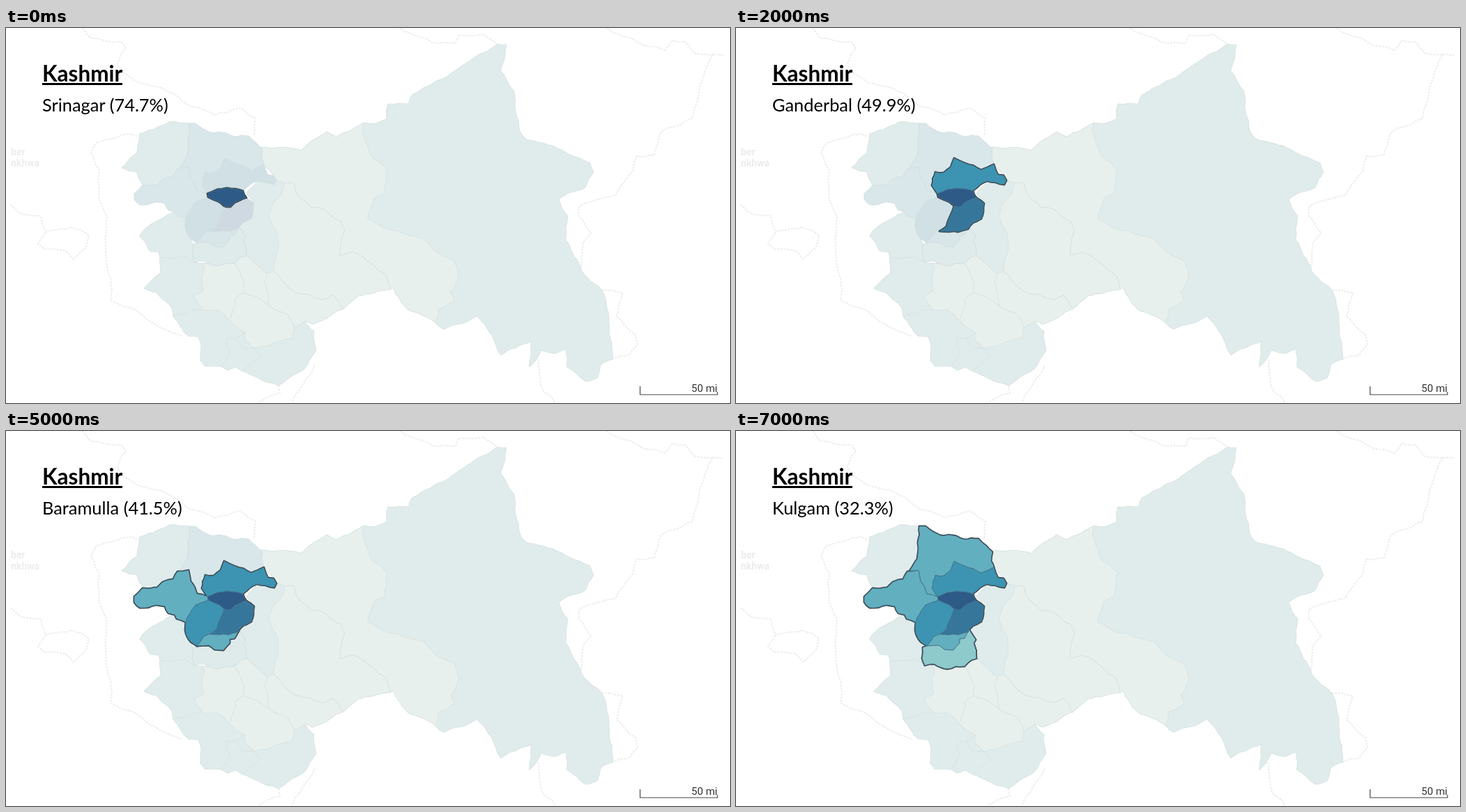
Recreate the animation shown at these times as an HTML page. Size 1039 by 539 pixels, loop 8 s.

```html
<!DOCTYPE html>
<html lang="en">
<head>
<meta charset="utf-8">
<title>Kashmir districts</title>
<style>
  @property --t { syntax: "<integer>"; inherits: true; initial-value: 0; }
  @keyframes step { from { --t: 0; } to { --t: 8; } }
  html, body { margin: 0; width: 100%; height: 100%; overflow: hidden; background: #fff; }
  body { position: relative; animation: step 8s steps(8, end) infinite; }
  svg { position: absolute; inset: 0; width: 1039px; height: 539px; }
  path { stroke-linejoin: round; }
  .dots { fill: none; stroke: #ededed; stroke-width: 2; stroke-dasharray: 3 1.5; }
  .land { fill: #e0ecec; stroke: #dae5e4; stroke-width: 1.2; }
  .pale { fill: #e8f0ed; }
  .lines { fill: none; }
  .muted { fill: var(--muted); stroke: #d3dfe1; }
  .rim, .active { opacity: calc(var(--t) - var(--i) + 1); }
  .rim { fill: none; stroke: #30393f; stroke-width: 2.8; }
  .active { fill: var(--active); stroke: #48738a; stroke-width: .9; }
  .title, .label { position: absolute; left: 52px; white-space: nowrap; color: #000; font-family: Lato, sans-serif; }
  .title { top: 46px; font-size: 31.5px; font-weight: 700; line-height: 38px; }
  .title::after { content: ""; position: absolute; left: 0; right: 0; top: 33px; height: 2.5px; background: #000; }
  .label { top: 90px; width: 300px; height: 40px; overflow: hidden; font-size: 25.4px; line-height: 40px; }
  #names { transform: translateY(calc(var(--t) * -40px)); }
  .scale { font: 15px Roboto, sans-serif; fill: #333; }
  .place { font: 700 14px Roboto, sans-serif; fill: #ececec; }
</style>
</head>
<body>
<svg viewBox="0 0 1039 539">
  <defs id="districts">
    <path data-label="Srinagar (74.7%)" style="--muted:#cbd8e2;--active:#2e5a88" d="M289 238 303 232 317 230 340 234 345 244 328 251 322 257 313 256 306 250 290 243Z"/>
    <path data-label="Pulwama (59.3%)" style="--muted:#ced9e2;--active:#36769b" d="M345 244 356 252 355 264 352 274 340 280 333 289 319 293 292 292 302 285 313 256 322 257 328 251Z"/>
    <path data-label="Ganderbal (49.9%)" style="--muted:#d0e0e5;--active:#3c94b2" d="M313 187 328 194 352 204 370 196 376 211 384 212 388 219 385 225 360 220 340 234 317 230 303 232 289 238 281 226 286 207 298 208 308 200Z"/>
    <path data-label="Budgam (47.5%)" style="--muted:#d0e0e5;--active:#3c94b2" d="M290 243 306 250 313 256 302 285 292 292 284 295 274 309 265 303 257 286 258 275 266 258 272 250Z"/>
    <path data-label="Shopian (42.3%)" style="--muted:#d8e6e9;--active:#62afbf" d="M274 309 284 295 292 292 319 293 333 289 328 298 321 299 321 305 312 315 299 314 291 308Z"/>
    <path data-label="Baramulla (41.5%)" style="--muted:#d9e7ea;--active:#62afbf" d="M184 246 184 238 196 226 217 225 225 217 240 213 246 202 262 200 265 216 274 234 289 238 290 243 272 250 266 258 258 275 245 270 242 264 233 262 228 252 216 250 192 254Z"/>
    <path data-label="Bandipora (34.6%)" style="--muted:#d9e7ea;--active:#62afbf" d="M263 137 272 137 293 150 316 151 328 156 348 155 368 174 366 187 370 196 352 204 328 194 313 187 308 200 298 208 286 207 281 226 289 238 274 234 265 216 262 200 249 201 260 184Z"/>
    <path data-label="Kulgam (32.3%)" style="--muted:#dfebeb;--active:#8ec9cb" d="M274 309 268 311 267 327 271 337 285 335 303 342 328 338 338 329 345 327 341 305 344 300 335 286 328 298 321 299 321 305 312 315 299 314 291 308Z"/>
  </defs>

  <g class="dots">
    <path d="M110 0 120 14 165 20 172 30 160 50 163 62 195 80 235 92 265 113 300 125 336 115 358 130 356 155"/>
    <path d="M188 156 180 152 130 165 122 180 134 204 133 245 145 270 143 320 152 375 150 390 190 408 220 430 252 443"/>
    <path d="M7 254 25 268 50 270 57 293 95 286 119 298 116 312 96 332 85 320 55 318 46 310 57 293"/>
    <path d="M565 0 580 8 612 21 645 22 650 10 685 9 705 23"/>
    <path d="M862 0 905 20 945 32 955 18 975 20 990 37 1030 39M1015 37 995 85 985 130 940 150 930 183 905 184 900 205 875 240 823 256 822 270 840 295 828 310 825 345"/>
    <path d="M855 377 885 380 876 415 903 440 906 455 895 470 871 476"/>
    <path d="M764 476 770 520 788 539M391 514 393 525 362 538M443 485 435 500 410 538"/>
  </g>

  <g class="land">
    <path d="M514 136 530 137 546 131 548 109 578 109 582 97 705 23 718 24 710 62 729 91 737 147 745 159 797 175 838 194 843 207 831 229 793 246 806 270 803 305 826 349 855 377 866 430 871 476 853 485 849 502 832 508 805 487 804 462 786 468 768 463 751 487 754 450 710 470 697 441 676 414 628 433 617 424 620 405 643 392 638 380 650 354 644 335 617 322 600 303 550 290 519 275 528 245 543 238 547 203 525 185 512 150Z"/>
    <path d="M192 152 212 146 234 135 263 137 260 184 249 201 240 213 217 225 196 226 188 207 166 201 188 180Z"/>
    <path d="M242 264 258 275 257 286 265 303 268 311 267 327 271 337 258 329 235 331 221 330 219 322 207 321 192 299 208 282 232 268Z"/>
    <path d="M221 330 235 331 258 329 271 337 281 338 285 345 281 360 283 378 270 385 284 406 262 408 240 414 238 402 216 380 198 374 222 352Z"/>
    <path d="M240 414 262 408 284 406 303 405 343 437 330 446 318 445 316 456 322 465 310 487 285 486 279 478 280 455 276 444 262 443Z"/>
    <path d="M343 437 342 447 355 460 375 457 410 446 413 430 429 421 442 436 445 463 428 490 391 514 350 498 330 487 318 492 310 487 322 465 316 456 318 445 330 446Z"/>
    <path d="M345 238 360 220 388 219 400 223 395 240 383 252 377 270 390 298 391 310 384 350 375 353 345 327 341 305 344 300 335 286 352 274 356 252Z"/>
    <path class="pale" d="M366 171 424 176 460 149 474 156 514 136 512 150 525 185 547 203 543 238 528 245 519 275 550 290 600 303 617 322 644 335 650 354 638 380 643 392 620 405 617 424 576 404 555 373 551 376 545 355 525 339 497 322 479 327 486 290 481 278 455 260 438 258 416 235 413 223 400 223 388 219 384 212 370 196 368 174Z"/>
    <path class="pale" d="M400 223 413 223 416 235 438 258 455 260 481 278 486 290 479 327 497 322 525 339 545 355 551 376 505 385 483 404 470 384 455 391 410 377 384 350 391 310 390 298 377 270 383 252 395 240Z"/>
    <path class="pale" d="M384 350 410 377 455 391 470 384 483 404 455 420 440 426 429 421 413 430 410 446 375 457 355 460 342 447 343 437 303 405 284 406 270 385 283 378 281 360 285 345 281 338 303 342 328 338 338 329 345 327 375 353Z"/>
    <path class="lines" d="M328 338 342 366 341 380 328 390 330 398 322 418M341 380 355 385 378 400 405 413 413 430M375 353 371 365 378 400M330 446 340 460 355 460 365 470 341 492"/>
  </g>

  <g id="base"></g>
  <g id="rims"></g>
  <g id="fills"></g>
  <path d="M910 515V527H1021V523" fill="none" stroke="#444" stroke-width="1.2"/>
  <text class="scale" x="1021" y="523" text-anchor="end">50 mi</text>
  <text class="place" x="7" y="183">ber</text>
  <text class="place" x="7" y="199">nkhwa</text>
</svg>
<div class="title">Kashmir</div>
<div class="label"><div id="names"></div></div>
<script>
  const $ = id => document.getElementById(id);

  // Seeded by position, so neighbours get the same border.
  const noise = (x, y) => {
    const n = Math.sin(x * 12.99 + y * 78.23) * 43758.5;
    return n - Math.floor(n) - 0.5;
  };

  // Midpoints from a to b, pushed sideways for a natural border.
  function roughen(a, b) {
    const dx = b[0] - a[0], dy = b[1] - a[1], len = Math.hypot(dx, dy);
    if (len < 9) return [b];
    const side = dx > 0 || (dx === 0 && dy > 0) ? 1 : -1;
    const mx = (a[0] + b[0]) / 2, my = (a[1] + b[1]) / 2;
    const push = side * noise(mx, my) * Math.min(len, 25) * 0.16 / len;
    const mid = [mx - dy * push, my + dx * push];
    return [...roughen(a, mid), ...roughen(mid, b)];
  }

  function roughPath(d) {
    return d.match(/M[^M]+/g).map(part => {
      const closed = part.endsWith("Z");
      const nums = part.match(/\d+/g).map(Number);
      const pts = [];
      for (let i = 0; i < nums.length; i += 2) pts.push([nums[i], nums[i + 1]]);
      if (closed) pts.push(pts[0]);
      const out = [pts[0]];
      for (let i = 1; i < pts.length; i++) out.push(...roughen(pts[i - 1], pts[i]));
      return "M" + out.map(p => p.map(v => v.toFixed(1)).join(" ")).join("L") + (closed ? "Z" : "");
    }).join("");
  }

  document.querySelectorAll("defs path, .land path, .dots path").forEach(path =>
    path.setAttribute("d", roughPath(path.getAttribute("d"))));

  const layers = { base: "muted", rims: "rim", fills: "active" };
  [...$("districts").children].forEach((district, i) => {
    district.style.setProperty("--i", i);
    for (const id in layers) {
      const copy = district.cloneNode();
      copy.setAttribute("class", layers[id]);
      $(id).append(copy);
    }
    const name = document.createElement("div");
    name.textContent = district.dataset.label;
    $("names").append(name);
  });
</script>
</body>
</html>
```
